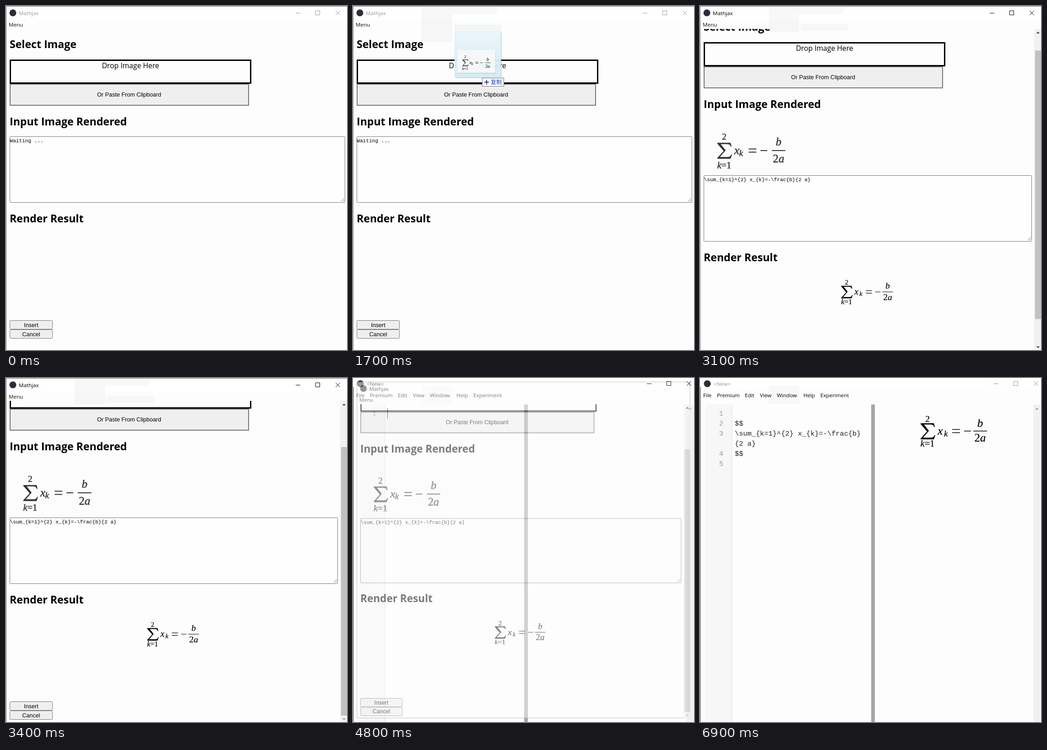
These frames come from a looping animation (745 by 752 pixels, 7000 ms). An HTML page:

```html
<!DOCTYPE html>
<html lang="en">
<head>
<meta charset="utf-8">
<title>Formula insert</title>
<style>
html, body { margin: 0; width: 100%; height: 100%; overflow: hidden; background: #fff; }
svg { display: block; width: 745px; height: 752px; }
text { white-space: pre; }
.ui { font: 11.6px "Open Sans", "Noto Sans", sans-serif; }
.body { font: 15.7px "Open Sans", "Noto Sans", sans-serif; }
.head { font: 700 23.1px "Open Sans", "Noto Sans", sans-serif; }
.btn { font: 12.6px "Liberation Sans", Arial, sans-serif; text-anchor: middle; }
.area { font: 11.1px "Liberation Mono", monospace; }
.code { font: 15.3px "Liberation Mono", monospace; }
.math { font-family: "Liberation Serif", serif; }
.cjk { font: 12px "Noto Sans CJK SC", "Noto Sans CJK", sans-serif; }
</style>
</head>
<body>
<svg id="stage" viewBox="0 0 745 752" xmlns="http://www.w3.org/2000/svg"></svg>
<script>
const LOOP = 7000, STEP = 100;
const PAGE = '#fdfdfd', INACTIVE = '#999', MAX_SCROLL = 103, IMAGE_HEIGHT = 123;
const LATEX = '\\sum_{k=1}^{2} x_{k}=-\\frac{b}{2 a}';
const stage = document.getElementById('stage');

const rect = (x, y, w, h, fill, extra = '') =>
  `<rect x="${x}" y="${y}" width="${w}" height="${h}" fill="${fill}" ${extra}/>`;
const path = (d, stroke, width = 1, extra = '') =>
  `<path d="${d}" fill="none" stroke="${stroke}" stroke-width="${width}" ${extra}/>`;
const text = (x, y, cls, str, fill = '#000', extra = '') =>
  `<text x="${x}" y="${y}" class="${cls}" fill="${fill}" ${extra}>${str.replace(/</g, '&lt;')}</text>`;
const group = (transform, body, extra = '') => `<g transform="${transform}" ${extra}>${body}</g>`;
const outlined = (x, y, w, h, fill, stroke, width, extra = '') =>
  rect(x + width / 2, y + width / 2, w - width, h - width, fill,
    `stroke="${stroke}" stroke-width="${width}" ${extra}`);

// Vertical placement of limits and fraction, relative to the math axis
const TYPESET = { top: -20, bottom: 34, sub: 51, frac: 115, num: -9, den: 23, line: 1.6, weight: 0.2, color: '#000' };
const PICTURE = { top: -24, bottom: 39, sub: 48, frac: 120, num: -11, den: 26, line: 2.2, weight: 0.5, color: '#333' };

function formula(x, y, scale, m) {
  const italic = str => `<tspan font-style="italic">${str}</tspan>`;
  const glyph = (gx, gy, size, content, anchor = 'middle') =>
    `<text x="${gx}" y="${gy}" class="math" font-size="${size}" text-anchor="${anchor}">${content}</text>`;
  const sigma = 'M0-17H29L31-9H29.5Q28-14.5 22-14.5H7L18-.5 5 14.5H23Q28.5 14.5 30.5 9H32L29 18H0V16.5L14 1 0-15.5Z';
  const middle = m.frac + 15;
  return group(`translate(${x} ${y}) scale(${scale})`,
    `<path d="${sigma}"/>` +
    glyph(15, m.top, 19.5, '2') +
    glyph(15, m.bottom, 20.5, italic('k') + '=1') +
    glyph(37, 8, 26, italic('x'), 'start') +
    glyph(m.sub, 12, 19, italic('k'), 'start') +
    path(`M69-3.5H86M69 3.5H86M95 0H110M${m.frac} 0h30`, m.color, m.line) +
    glyph(middle, m.num, 25, italic('b')) +
    glyph(middle, m.den, 25, '2' + italic('a')),
    `fill="${m.color}" stroke="${m.color}" stroke-width="${m.weight}"`);
}

const windowButtons = (dx, dy, color) => group(`translate(${dx} ${dy})`,
  path('M633 15.5H643M676.5 10.5H685.5V19.5H676.5ZM720.5 10.5L729.5 20M729.5 10.5L720.5 20', color));

const icon = (x, y) => `<circle cx="${x}" cy="${y}" r="7.5" fill="#2b2e3a"/>`;

const arrow = (x, y, dir, color) =>
  `<path d="M${x - 4} ${y + 2 * dir}L${x} ${y - 2 * dir}L${x + 4} ${y + 2 * dir}Z" fill="${color}"/>`;

function button(y, label, hover) {
  return outlined(8, y, 94, 20, hover ? '#e3e3e3' : '#efefef', hover ? '#4f4f4f' : '#767676', 1, 'rx="2"') +
    text(55, y + 14.5, 'btn', label);
}

function dragPreview(x, y) {
  return group(`translate(${x} ${y})`,
    rect(0, 0, 102, 17, '#f3f5f6', 'opacity=".8"') +
    rect(2, 18, 101, 100, '#8aa', 'opacity=".35" rx="2"') +
    rect(0.5, 16.5, 100, 99, 'url(#glass)', 'stroke="#cfe8f3" rx="2"') +
    rect(7, 59, 83, 49, '#9ab', 'opacity=".3"') +
    rect(6, 57, 83, 49, '#fcfcfc', 'opacity=".87"') +
    formula(17, 84, 0.41, PICTURE) +
    outlined(60, 117, 48, 19, '#fff', '#777', 1) +
    path('M65 126.5H75M70 121.5V131.5', '#1a3cc8', 2) +
    text(79, 131, 'cjk', '复制', '#1a3cc8'));
}

function dialogPage(t) {
  const loaded = t >= 1900, done = t >= 2800;
  const shift = loaded ? IMAGE_HEIGHT : 0;
  const right = loaded ? 725 : 741;
  const top = 285 + shift, bottom = top + 145;
  const border = t >= 2600 && t < 3100 ? '#222' : '#767676';
  return text(8, 92, 'head', 'Select Image') +
    outlined(8, 117, 528, 53, PAGE, '#000', 3) +
    text(272, 136, 'body', 'Drop Image Here', '#000', 'text-anchor="middle"') +
    outlined(8, 170, 523, 48, '#efefef', '#767676', 2) +
    text(269, 198, 'btn', 'Or Paste From Clipboard') +
    text(8, 261, 'head', 'Input Image Rendered') +
    (loaded ? rect(8, 285, 208, 121, '#fcfcfc') + formula(38, 354, 0.99, PICTURE) : '') +
    outlined(8, top, right - 8, bottom - top, '#fefefe', border, 1, 'rx="1"') +
    path(`M${right - 9} ${bottom - 3}l7-7M${right - 5} ${bottom - 3}l3-3`, '#777') +
    text(8.5, top + 12.5, 'area', done ? LATEX : 'Waiting ...') +
    text(8, 473 + shift, 'head', 'Render Result') +
    (done ? formula(308.5, 663, 0.78, TYPESET) : '') +
    button(687 + shift, 'Insert', t >= 4300 && t < 4700) +
    button(707 + shift, 'Cancel', false);
}

function dialog(t, closing) {
  const active = t >= 1800;
  const step = Math.min(4, Math.max(0, (t - 3000) / 100));
  const scroll = Math.round(MAX_SCROLL * (1 - (1 - step / 4) ** 1.6));
  const atEnd = scroll === MAX_SCROLL;
  const bar = rect(730, 50, 15, 702, '#f1f1f1') +
    rect(732, 66 + scroll * 85 / MAX_SCROLL, 13, 587, '#c1c1c1') +
    arrow(738.5, 58, 1, scroll ? '#505050' : '#a3a3a3') +
    arrow(738.5, 746, -1, atEnd ? '#a3a3a3' : '#505050');
  return rect(0, 0, 745, 752, PAGE) + rect(0, 0, 745, 30, '#fff') +
    (closing ? path('M.5.5H744.5V751.5H.5Z', '#888') :
      rect(0, 0, 745, 1, '#666') + rect(0, 0, 1, 752, '#888')) +
    icon(15, 15) +
    text(28, 20, 'ui', 'Mathjax', active ? '#000' : INACTIVE) +
    (closing ? '' : windowButtons(0, 0, active ? '#000' : INACTIVE)) +
    text(6, 45, 'ui', 'Menu', '#111') +
    `<g clip-path="url(#below)">${group(`translate(0 ${-scroll})`, dialogPage(t))}</g>` +
    (t >= 1900 ? bar : '');
}

const MENU = [['File', 7], ['Premium', 37], ['Edit', 98], ['View', 131],
  ['Window', 168], ['Help', 226], ['Experiment', 263]];

function caretOn(t) {
  return t < 5300 || (t >= 5500 && t < 6000) || t === 6500;
}

function editor(t) {
  const inserted = t >= 5000;
  const active = t < 6600;
  const hover = t === 6400 ? 0.5 : t === 6500 ? 1 : t >= 6600 ? 0.06 : 0;
  const rows = inserted
    ? [['1', ''], ['2', '$$'], ['3', LATEX.slice(0, 30)], ['', LATEX.slice(30)], ['4', '$$'], ['5', '']]
    : [['1', '']];
  return rect(0, 0, 745, 752, PAGE) + rect(0, 0, 745, 26, '#fff') +
    rect(0, 20, 1, 732, '#333') +
    rect(150, 17, 67, 40, '#f8f8f8') +
    icon(16, 12.5) +
    text(30, 17, 'ui', '<New>', active ? '#000' : INACTIVE) +
    rect(624, 0, 43, 26, '#e5e5e5', `opacity="${hover}"`) +
    windowButtons(9, -3, active ? '#111' : INACTIVE) +
    MENU.map(([label, x]) => text(x, 42, 'ui', label)).join('') +
    rect(12, 58, 57, 694, '#f7f7f7') + rect(69, 58, 1, 694, '#ddd') +
    rect(728, 58, 16, 694, '#f1f1f1') + arrow(736, 67, 1, '#a3a3a3') +
    rows.map(([number, line], i) => {
      const y = 82 + i * 21.9;
      return text(51, y, 'code', number, '#999', 'text-anchor="end"') + text(76, y, 'code', line, '#222');
    }).join('') +
    (caretOn(t) ? rect(75, inserted ? 175 : 66, 1, 22, '#000') : '') +
    rect(374, 58, 8, 694, '#a6a6a6') +
    (t >= 5800 ? formula(482, 116, 1, TYPESET) : '');
}

const defs = `<defs>
  <clipPath id="below"><rect x="0" y="50" width="745" height="702"/></clipPath>
  <linearGradient id="glass" x1="0" y1="0" x2="0" y2="1">
    <stop offset="0" stop-color="#edf8fc" stop-opacity=".9"/>
    <stop offset="1" stop-color="#d6ecf7" stop-opacity=".9"/>
  </linearGradient></defs>`;

const DRAG_PATH = [[150, -39], [150, -39], [192, -26], [211, -12], [222, 40]];
const CLOSING = [[0.99, 0.82], [0.978, 0.5], [0.96, 0.18]];

function trail(t) {
  if (t < 1600) return '';
  const first = rect(150, 0, 67, t >= 3100 ? 57 : 78, '#f8f8f8') + rect(217, 0, 97, 17, '#f8f8f8');
  return `<g style="mix-blend-mode:multiply">${first}${t >= 1800 ? rect(220, 39, 103, 16, '#f9f9f9') : ''}</g>`;
}

function scene(t) {
  if (t >= 5000) return editor(t);
  if (t >= 4700) {
    const [scale, opacity] = CLOSING[(t - 4700) / STEP];
    const place = `translate(372.5 376) scale(${scale}) translate(-372.5 -376)`;
    return editor(t) + group(place, dialog(t, true), `opacity="${opacity}"`) +
      windowButtons(9, -3, '#222');
  }
  const drag = DRAG_PATH[(t - 1300) / STEP];
  return dialog(t, false) + trail(t) + (drag ? dragPreview(...drag) : '');
}

let shown = -1;
function render(ms) {
  const t = Math.floor((ms % LOOP) / STEP) * STEP;
  if (t !== shown) {
    shown = t;
    stage.innerHTML = defs + scene(t);
  }
}

const start = performance.now();
function tick() {
  render(performance.now() - start);
  requestAnimationFrame(tick);
}
tick();
</script>
</body>
</html>
```
